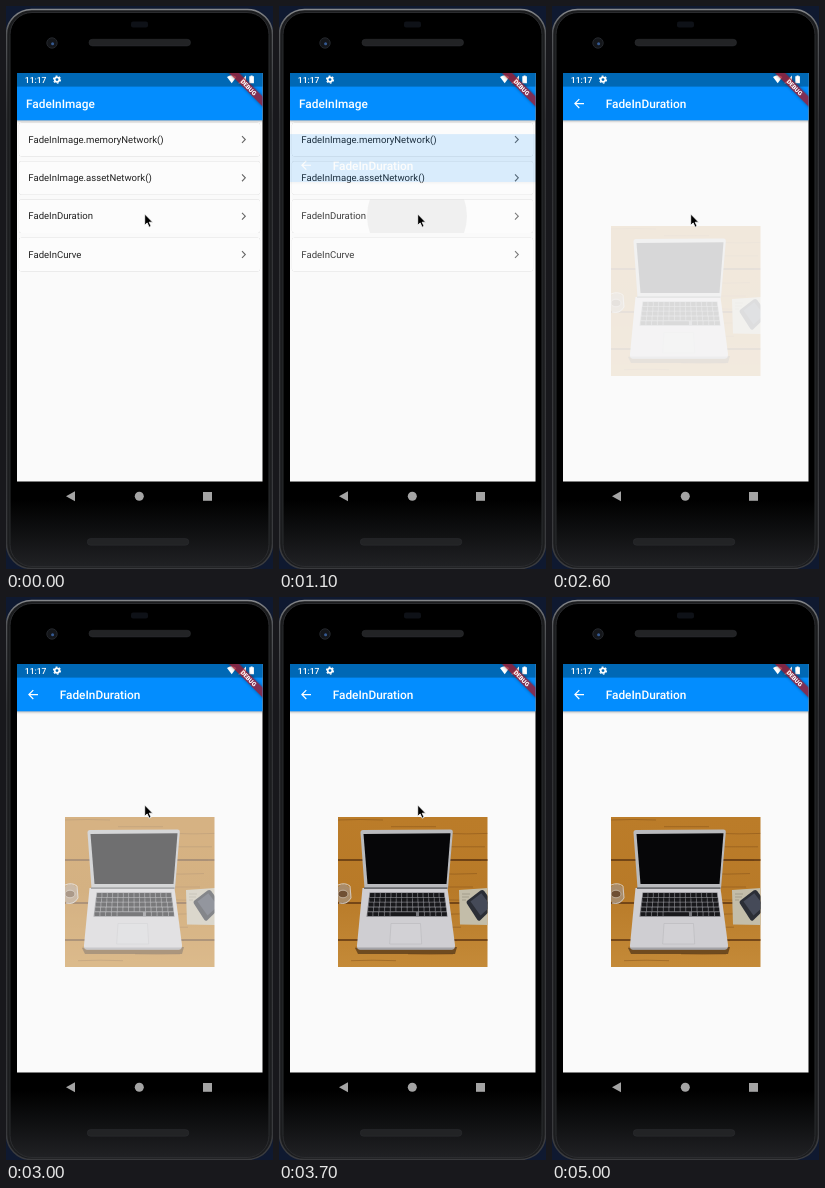
These frames come from a looping animation (267x563 px, 5.1 s). An HTML page:

```html
<!DOCTYPE html>
<html lang="en">
<head>
<meta charset="utf-8">
<title>Fade in duration</title>
<style>
  html, body { margin: 0; width: 100%; height: 100%; overflow: hidden; background: #0f1930; }
  svg { display: block; width: 267px; height: 563px; }
  text { font-family: Roboto, sans-serif; text-rendering: geometricPrecision; }
  .title { font-size: 11.85px; font-weight: 500; fill: #fff; }
  .item { font-size: 9.57px; fill: #212121; }
  .card { fill: #fcfcfc; filter: drop-shadow(0 .7px .7px rgba(0, 0, 0, .26)); }
  .bar { fill: #038dfe; filter: drop-shadow(0 1px 1.2px rgba(0, 0, 0, .28)); }
</style>
</head>
<body>
<svg viewBox="0 0 267 563">
  <defs>
    <clipPath id="screen"><rect x="11" y="67" width="245.5" height="408.5"/></clipPath>
    <clipPath id="row"><rect x="12.9" y="193.5" width="241.2" height="33.6" rx="2.4"/></clipPath>
    <clipPath id="frame"><rect x="59" y="220" width="149.5" height="150"/></clipPath>
    <linearGradient id="edge" x2="0" y2="1">
      <stop stop-color="#85878a"/><stop offset=".04" stop-color="#55575a"/>
      <stop offset=".2" stop-color="#303134"/><stop offset="1" stop-color="#3a3b3e"/>
    </linearGradient>
    <linearGradient id="chin" x2="0" y2="1">
      <stop stop-color="#000"/><stop offset=".88" stop-color="#000"/><stop offset="1" stop-color="#202124"/>
    </linearGradient>
    <linearGradient id="wood" x2="0" y2="1">
      <stop stop-color="#bb7c29"/><stop offset=".5" stop-color="#b87a28"/><stop offset="1" stop-color="#c48a38"/>
    </linearGradient>
  </defs>

  <!-- phone -->
  <rect width="267" height="563" fill="#0f1930"/>
  <path d="M0 155h2v7H0z" fill="#6b6d70"/>
  <rect x=".5" y="3.500" width="266" height="559" rx="25" fill="#1b1c1e" stroke="url(#edge)" stroke-width="1.500"/>
  <rect x="4" y="6.500" width="259" height="554" rx="22" fill="url(#chin)" stroke="#2b2c2f"/>
  <rect x="125" y="15.500" width="17" height="6" rx="2" fill="#0e1117"/>
  <g fill="#222325" stroke="#2b2c2f" stroke-width=".6">
    <rect x="83" y="33.300" width="101.500" height="6.600" rx="3.300"/>
    <rect x="81.300" y="532.600" width="101.500" height="6.600" rx="3.300"/>
  </g>
  <circle cx="46" cy="37" r="5.200" fill="#14161a" stroke="#24272c"/>
  <circle cx="46.600" cy="37.800" r="1.500" fill="#365a92"/>
  <g fill="#a4a4a4">
    <path d="M60 490.300l9-5v10z"/>
    <circle cx="133.300" cy="490.300" r="4.500"/>
    <rect x="197" y="486" width="9" height="8.800"/>
  </g>

  <g clip-path="url(#screen)">
    <g id="list">
      <rect x="10" y="66" width="248" height="410" fill="#fafafa"/>
      <g id="cards"></g>
      <g clip-path="url(#row)"><circle id="ripple" cx="138" cy="210" r="0" fill="#000" opacity=".055"/></g>
      <rect class="bar" x="10" y="66" width="248" height="48.300"/>
      <text class="title" x="20" y="102.200">FadeInImage</text>
    </g>

    <g id="page">
      <rect x="10" y="66.500" width="248" height="410" fill="#fafafa"/>
      <g id="spinner"></g>
      <g id="photo" clip-path="url(#frame)">
        <rect x="59" y="220" width="150" height="150" fill="url(#wood)"/>
        <g id="grain" fill="none" stroke="#5c3410"></g>
        <path d="M76 351l102-1-2 7H79z" fill="#3a2412" opacity=".6"/>
        <path d="M81.500 235.500q0-2.500 2.500-2.500l87.500-.5q2.500 0 2.300 2.500L169 291.500H85.500z" fill="#b9babd"/>
        <path d="M84.500 237l87-.8-4 50.800H88.500z" fill="#060608"/>
        <path d="M83.500 291h85l7.500 57q.3 4-3 4.300H81q-3.300-.2-3-4z" fill="#cfced2"/>
        <path d="M78.200 350.500h97.500q-.5 2.300-3 2.300H81q-2.400 0-2.800-2.300z" fill="#a3a3a8"/>
        <path d="M85 290.300h83.500v1.600H85z" fill="#6c6d71"/>
        <path d="M90.500 295.500h75l3 24.200H87.500z" fill="#77777c"/>
        <g id="keys" fill="#18181b"></g>
        <path d="M112 326.500h29.500l1.200 20.500h-32z" fill="#d2d1d5" stroke="#b9b9bd" stroke-width=".6"/>
        <ellipse cx="64.500" cy="297" rx="7.800" ry="10" fill="#a5907a" opacity=".8"/>
        <path d="M59 288q7-3 12 1l1 12q-4 7-12 5" fill="none" stroke="#d3c8bc"/>
        <ellipse cx="64" cy="297" rx="5" ry="3.800" fill="#6f5034" stroke="#cbbdab" stroke-width=".8"/>
        <path d="M180 293l29-2v37l-28-.5z" fill="#c3bda9"/>
        <path d="M183 297h8m-8 3h7m-7 3h4" stroke="#8d8878" stroke-width=".6"/>
        <path d="M188.500 303.500l13-10q2-1.400 3.700.5L216 309l-15 14.500q-1.500.8-2.700-.8l-10.300-16q-1-2 .5-3.200z" fill="#2b2e36"/>
        <path d="M191.500 304.500l10.800-8.300L212 309l-10.500 9.500z" fill="#454a58"/>
      </g>
      <rect class="bar" x="10" y="66.500" width="248" height="47.800"/>
      <path d="M32 97.600h-9m4.300-4.400l-4.400 4.400 4.400 4.400" fill="none" stroke="#fff" stroke-width="1.200"/>
      <text class="title" x="53.700" y="102.200">FadeInDuration</text>
    </g>

    <!-- status bar -->
    <rect x="10" y="66" width="248" height="14.600" fill="#0068b5"/>
    <text x="18.800" y="77" font-size="8.500" font-weight="500" fill="#fff">11:17</text>
    <circle cx="51" cy="73.600" r="2.300" fill="none" stroke="#fff" stroke-width="1.700"/>
    <circle cx="51" cy="73.600" r="3.500" fill="none" stroke="#fff" stroke-width="1.200" stroke-dasharray="1.830"/>
    <g fill="#fff">
      <path d="M221 71q4.700-3.600 9.400 0l-4.700 6.300z"/>
      <path d="M240 69.500v7.800h-7.600z"/>
      <path d="M243.300 70.300h1.300v-.9h2v.9h1.300v7h-4.600z"/>
    </g>
    <g transform="translate(257 67) rotate(45)">
      <rect x="-30" y="16.800" width="60" height="7.200" fill="#a0182a" opacity=".8" style="filter:drop-shadow(0 0 1.800px rgba(0,0,0,.5))"/>
      <text y="22.600" font-size="6.100" font-weight="900" fill="#fff" text-anchor="middle">DEBUG</text>
    </g>
  </g>

  <path id="cursor" d="M138.700 208v11.300l2.500-2.400 1.900 4.300 2-.9-1.900-4.100h3.500z" fill="#000" stroke="#fff" stroke-width=".8"/>
</svg>

<script>
const LOOP = 5100, STEP = 100;
const $ = id => document.getElementById(id);

function add(parent, tag, attrs, text) {
  const el = document.createElementNS('http://www.w3.org/2000/svg', tag);
  for (const key in attrs) el.setAttribute(key, attrs[key]);
  if (text) el.textContent = text;
  parent.append(el);
  return el;
}

// Cubic bezier easing solved by bisection
function bezier(x1, y1, x2, y2) {
  const at = (a, b, s) => 3 * (1 - s) * (1 - s) * s * a + 3 * (1 - s) * s * s * b + s ** 3;
  return x => {
    if (x <= 0 || x >= 1) return x <= 0 ? 0 : 1;
    let lo = 0, hi = 1;
    for (let i = 0; i < 24; i++) {
      const mid = (lo + hi) / 2;
      if (at(x1, x2, mid) < x) lo = mid; else hi = mid;
    }
    return at(y1, y2, lo);
  };
}
const easeIn = bezier(.42, 0, 1, 1);
const easeOut = bezier(0, 0, .58, 1);
const fastOutSlowIn = bezier(.4, 0, .2, 1);
const progress = (t, start, length) => Math.min(1, Math.max(0, (t - start) / length));

['FadeInImage.memoryNetwork()', 'FadeInImage.assetNetwork()', 'FadeInDuration', 'FadeInCurve'].forEach((label, i) => {
  const y = 116.8 + i * 38.35;
  add($('cards'), 'rect', { class: 'card', x: 12.9, y, width: 241.2, height: 33.6, rx: 2.4 });
  add($('cards'), 'text', { class: 'item', x: 22.3, y: y + 19.9 }, label);
  add($('cards'), 'path', { d: `M236 ${y + 13.3}l3.3 3.4-3.3 3.4`, fill: 'none', stroke: '#666', 'stroke-width': 1.1 });
});

// Plank seams and grain
for (const y of [263, 306, 343]) add($('grain'), 'path', { d: `M59 ${y}h150`, 'stroke-width': 1.5 });
for (let i = 0; i < 22; i++) {
  const y = 223 + i * 6.7, x = 59 + (i * 53) % 110;
  add($('grain'), 'path', { d: `M${x} ${y}q22 ${i % 3 - 1} 45 0`, 'stroke-width': 1, opacity: .3 });
}

for (let row = 0; row < 5; row++) {
  const left = 91 - row * .6, pitch = (74.8 + row * 1.3) / 14;
  for (let k = 0; k < 14; k++) {
    if (row === 4 && k > 4 && k < 9) continue;
    add($('keys'), 'rect', { x: left + k * pitch, y: 296 + row * 4.8, width: pitch - .8, height: 3.9, rx: .5 });
  }
}
add($('keys'), 'rect', { x: 115.5, y: 315.2, width: 21.5, height: 3.9, rx: .5 });

const spokes = Array.from({ length: 8 }, (_, i) => add($('spinner'), 'path', {
  d: 'M0-3.600V-6.300', stroke: '#111', 'stroke-width': 1.7, 'stroke-linecap': 'round',
  transform: `translate(133.300 295) rotate(${i * 45})`
}));

function draw(t) {
  const enter = progress(t, 1010, 290);
  $('page').setAttribute('opacity', easeIn(enter));
  $('page').setAttribute('transform', `translate(0 ${102 * (1 - fastOutSlowIn(enter))})`);
  $('list').style.display = enter < 1 ? '' : 'none';
  $('ripple').setAttribute('r', 50 * progress(t, 900, 200) + 25 * progress(t, 1100, 100));

  const head = (t - 1900) / STEP;
  spokes.forEach((s, i) => {
    const age = (((head - i) % 8) + 8) % 8;
    s.setAttribute('opacity', Math.max(.1, 1 - age * .13));
  });
  $('spinner').setAttribute('opacity', t < 1200 ? 0 : 1 - easeOut(progress(t, 1980, 300)));
  $('photo').setAttribute('opacity', easeIn(progress(t, 2290, 1000)));
  $('cursor').style.display = t < 4500 ? '' : 'none';
}

const begin = performance.now();
function tick() {
  const t = (performance.now() - begin) % LOOP;
  draw(Math.floor(t / STEP) * STEP);
  requestAnimationFrame(tick);
}
tick();
</script>
</body>
</html>
```
